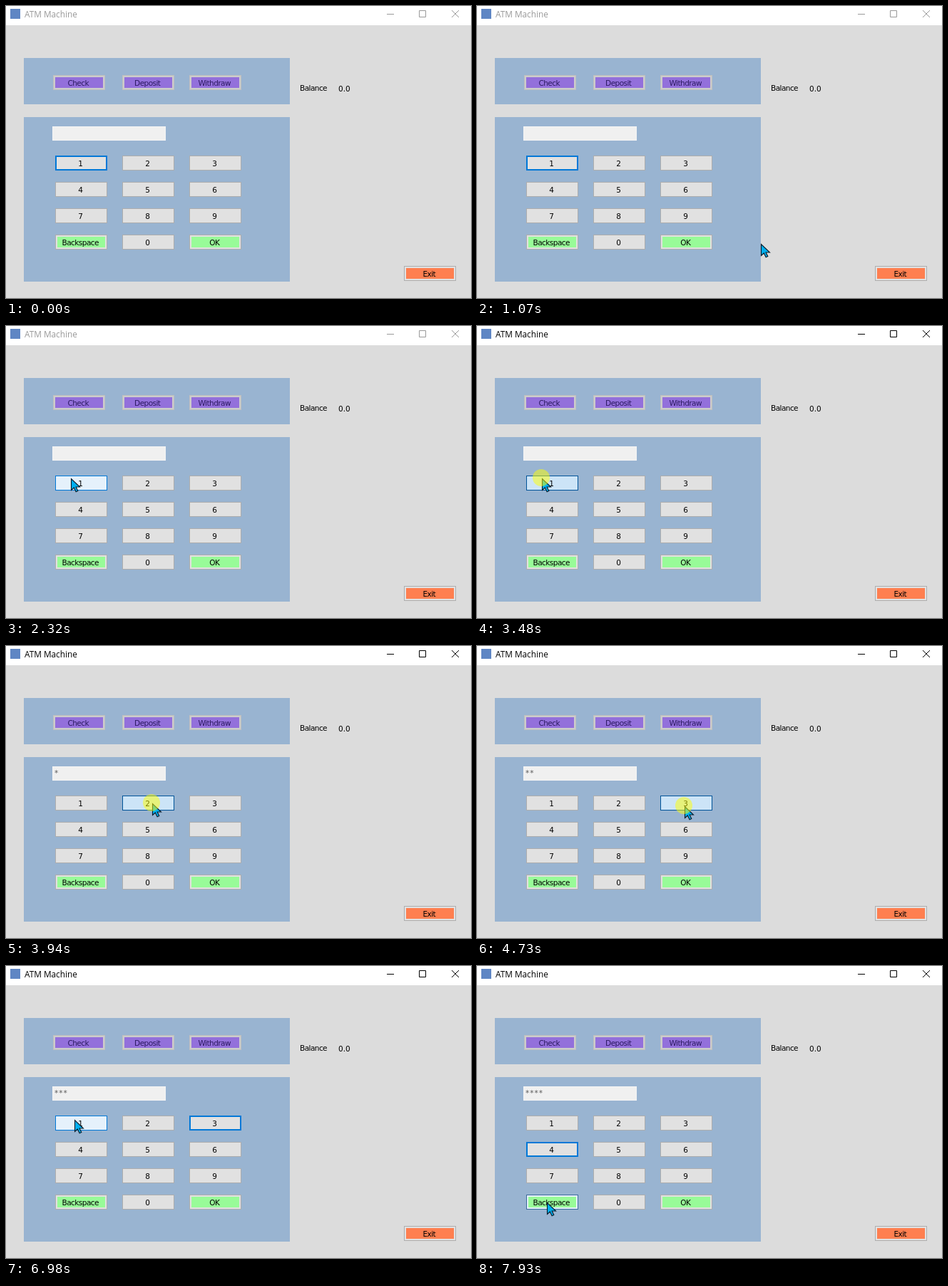
An HTML page for the animation above (8000 ms loop, 652 px wide and 410 px high).

```html
<!DOCTYPE html>
<html lang="en">
<head>
<meta charset="utf-8">
<title>ATM Machine</title>
<style>
html, body { margin: 0; width: 100%; height: 100%; overflow: hidden; background: #dcdcdc; }
body, body * { position: absolute; box-sizing: border-box; }
body { font: 10.5px/17px "DejaVu Sans", sans-serif; letter-spacing: -.55px; color: #000; white-space: pre; }
#bar { left: 0; top: 0; width: 100%; height: 27px; background: #fff; color: #999; }
#bar.active { color: #000; }
#bar span { left: 26px; top: 3px; font: 11.8px/17px "Open Sans", sans-serif; letter-spacing: 0; }
#icon { left: 6px; top: 4px; width: 14px; height: 14px; background: #5f86c4; }
#bar svg { left: 0; top: 0; fill: none; stroke: currentColor; }
.panel { left: 25px; width: 373px; background: #99b4d1; }
#pin { left: 65px; top: 169px; width: 159px; height: 20px; padding-left: 2px; line-height: 17px;
  background: #f0f0f0; border: 1px solid #f4f4f4; color: #5a5a5a; letter-spacing: 1px; }
.btn { width: 73px; height: 21px; padding: 2px; text-align: center; text-indent: -2.5px;
  border: 1px solid var(--edge);
  background: linear-gradient(var(--fill), var(--fill)) content-box, var(--face);
  --face: #e1e1e1; --edge: #adadad; --fill: transparent; }
.off { --face: #ccc; --edge: #bfbfbf; --fill: #9370db; color: #2c1a62; }
.green { --fill: #98fb98; }
.coral { --fill: #ff7f50; }
.focus { --edge: #0078d7; box-shadow: inset 0 0 0 1px #0078d7; }
.hover { --face: #e5f1fb; --edge: #0078d7; box-shadow: none; }
.green.hover { --edge: #3c6a9c; }
.press { --face: #cce4f7; --edge: #005499; box-shadow: none; }
#cursor { left: 0; top: 0; overflow: visible; }
</style>
</head>
<body>
<div id="bar">
  <div id="icon"></div><span>ATM Machine</span>
  <svg width="652" height="27"><path d="M534 11.5h10M579.5 6.5h9v9h-9zM625 6l10 10M635 6l-10 10"/></svg>
</div>
<div class="panel" style="top:73px;height:65px"></div>
<div class="panel" style="top:156px;height:231px"></div>
<div id="pin"></div>
<div style="left:412px;top:107px">Balance</div>
<div style="left:466px;top:108px;letter-spacing:0">0.0</div>
<svg id="cursor" width="1" height="1">
  <path d="M.5 .5V16.5L4.3 13L7.1 18.8L9.8 17.5L7.1 12H12.5Z" fill="#00b0f0" stroke="#0a1a28" stroke-width="1.1"/>
  <circle id="click" cx="-1" cy="-1" r="12" fill="#ff0" fill-opacity=".5"/>
</svg>
<script>
const $ = id => document.getElementById(id);
const LOOP = 8000, START = 760, TICK = 77.93;
const cursor = $("cursor");

function button(label, x, y, kind = "") {
  const el = document.createElement("div");
  el.textContent = label;
  el.className = "btn " + kind;
  el.style.cssText = `left:${x}px;top:${y}px`;
  document.body.insertBefore(el, cursor);
  return { label, x, y, el };
}

const keys = ["1", "2", "3", "4", "5", "6", "7", "8", "9", "Backspace", "0", "OK"].map((label, i) =>
  button(label, 69 + 94 * (i % 3), 210 + 37 * Math.floor(i / 3), label.length > 1 ? "green" : ""));
button("Check", 66, 97, "off");
button("Deposit", 163, 97, "off");
button("Withdraw", 257, 97, "off");
button("Exit", 558, 365, "coral");

// Pointer moves: first tick, last tick, end x, end y, height of arc
const enter = [488, 398];
const moves = [
  [0, 10, 231, 215], [10, 15, 97, 232, 42], [16, 20, 91, 214],
  [37, 41, 205, 221], [44, 48, 291, 225], [55, 60, 94, 222], [62, 64, 96, 216],
  [80, 83, 97, 254], [89, 92, 98, 332]
];
// Press and release ticks; the digits are entered in order
const clicks = [[35, 36], [41, 43], [51, 53], [85, 87]];

function pointer(n) {
  let [x, y] = enter;
  for (const [from, to, endX, endY, arc = 0] of moves) {
    const k = Math.min(1, Math.max(0, (n - from) / (to - from)));
    const ease = k * k * (3 - 2 * k);
    x += (endX - x) * ease;
    y += (endY - y) * ease - arc * Math.sin(Math.PI * k);
  }
  return [Math.round(x), Math.round(y)];
}

function draw(time) {
  const n = Math.floor((time % LOOP - START) / TICK + .25);
  const [x, y] = pointer(n);
  const pressed = clicks.filter(c => n >= c[0]).length;
  const entered = clicks.filter(c => n >= c[1]).length;
  const down = pressed > entered;
  const focus = keys[Math.max(0, pressed - 1)];

  for (const b of keys) {
    const over = n >= 0 && x >= b.x && x < b.x + 73 && y >= b.y && y < b.y + 21;
    b.el.classList.toggle("focus", b === focus);
    b.el.classList.toggle("hover", over && !down);
    b.el.classList.toggle("press", over && down);
  }
  $("bar").className = pressed ? "active" : "";
  $("pin").textContent = "*".repeat(entered);
  $("click").style.display = down ? "" : "none";
  cursor.style.display = n >= 0 ? "" : "none";
  cursor.style.transform = `translate(${x}px,${y}px)`;
}

function frame() {
  draw(performance.now());
  requestAnimationFrame(frame);
}
frame();
</script>
</body>
</html>
```
